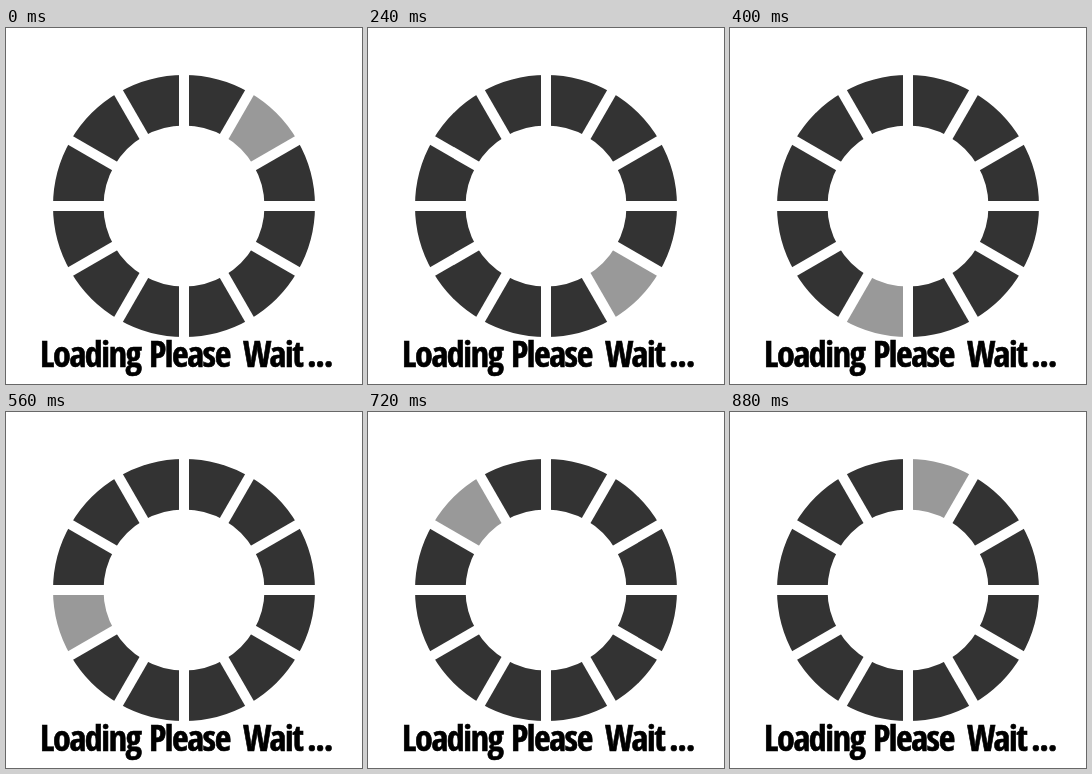
Write an HTML page that moves like this. It is 356 px wide and 356 px high and loops after 0.96 s.

```html
<!DOCTYPE html>
<html lang="en">
<head>
<meta charset="utf-8">
<title>Loading</title>
<style>
  html, body { margin: 0; height: 100%; overflow: hidden; background: #fff; }
  svg { display: block; width: 100%; height: 100%; }
  text {
    font: 900 36px Impact, "Open Sans Condensed", "Roboto Condensed", Roboto, sans-serif;
    letter-spacing: -1.4px;
    stroke: #000;
    stroke-width: .6;
  }
</style>
</head>
<body>
<svg viewBox="0 0 356 356">
  <g id="ring" fill="none" stroke-width="50.5"></g>
  <g id="gaps" stroke="#fff" stroke-width="10"></g>
  <text id="label" y="339"><tspan x="34">Loading</tspan> <tspan x="143">Please</tspan> <tspan x="237">Wait</tspan> <tspan x="301">...</tspan></text>
</svg>
<script>
const COUNT = 12, STEP = 80, CENTER = 178, RADIUS = 105.75;
const ring = document.getElementById('ring');
const gaps = document.getElementById('gaps');
const label = document.getElementById('label');

// Without a condensed face, a smaller size keeps the words apart.
if (label.firstChild.getComputedTextLength() > 112) label.style.fontSize = '31px';

function add(parent, tag, attrs) {
  const node = document.createElementNS('http://www.w3.org/2000/svg', tag);
  for (const key in attrs) node.setAttribute(key, attrs[key]);
  return parent.appendChild(node);
}

const half = RADIUS * Math.sin(Math.PI / COUNT);
const rise = RADIUS * Math.cos(Math.PI / COUNT);
const segments = Array.from({ length: COUNT }, (_, i) => {
  const angle = i * 360 / COUNT;
  add(gaps, 'path', {
    d: 'M0-70V-140',
    transform: `translate(${CENTER} ${CENTER}) rotate(${angle})`
  });
  return add(ring, 'path', {
    d: `M${-half} ${-rise}A${RADIUS} ${RADIUS} 0 0 1 ${half} ${-rise}`,
    transform: `translate(${CENTER} ${CENTER}) rotate(${angle + 180 / COUNT})`
  });
});

function draw() {
  const lit = (Math.floor(performance.now() / STEP) + 1) % COUNT;
  segments.forEach((segment, i) => segment.setAttribute('stroke', i === lit ? '#999' : '#333'));
  requestAnimationFrame(draw);
}
draw();
</script>
</body>
</html>
```
